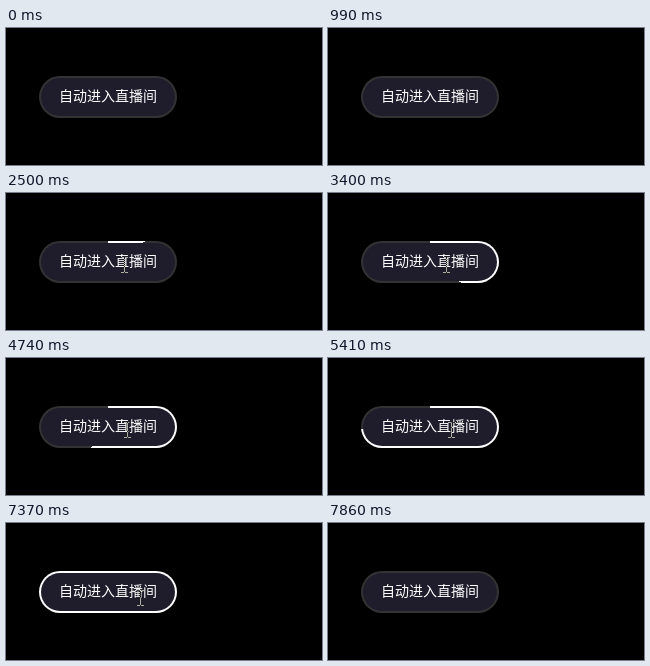
An HTML page for the animation above (8260 ms loop, 316 px wide and 137 px high).

```html
<!DOCTYPE html>
<html lang="zh-CN">
<head>
<meta charset="utf-8">
<style>
  html, body { margin: 0; width: 100%; height: 100%; overflow: hidden; background: #000; }
  #button {
    position: absolute; left: 33px; top: 48px; width: 138px; height: 42px;
    box-sizing: border-box; border: 2px solid transparent; border-radius: 21px;
    background:
      linear-gradient(#1f1c2b, #1f1c2b) padding-box,
      conic-gradient(#fff var(--angle, 0deg), #333 0) border-box;
    color: #fff; text-align: center; white-space: nowrap;
    font: 500 14px/34px "Noto Sans CJK SC", "Noto Sans CJK", sans-serif;
  }
  svg { position: absolute; left: 0; top: 0; overflow: visible; }
  #beam { mix-blend-mode: difference; }
</style>
</head>
<body>
<div id="button">自动进入直播间</div>
<svg id="arrow" width="12" height="19">
  <path d="M0 0V16.5L3.8 13 6.3 18.5 8.8 17.4 6.4 12H11.5Z" fill="#fff" stroke="#000" stroke-width=".7"/>
</svg>
<svg id="beam" width="7" height="16">
  <path d="M0 .5H3M4 .5H7M3.5 1V15M0 15.5H3M4 15.5H7" fill="none" stroke="#ccc"/>
</svg>
<script>
const LOOP = 8260, TICK = 67.9, ANCHOR = 1190;
const FILL_START = 1620, FILL_SPEED = 0.0709, LEAVE = 7525;

// Pointer moves, latest first; power shapes the easing
const moves = [
  { start: 7240, end: 7840, from: [125, 72], to: [330, 143], power: 2 },
  { start: 3790, end: 5900, from: [118, 72], to: [125, 72], power: 1 },
  { start: 1190, end: 2010, from: [185, 5], to: [118, 72], power: 0.7 },
  { start: 850, end: 986, from: [165, 2], to: [289, -24], power: 2 }
];

const [button, arrow, beam] = ["button", "arrow", "beam"].map(id => document.getElementById(id));

const clamp = (v, max) => Math.min(max, Math.max(0, v));

function pointerAt(t) {
  const move = moves.find(m => t >= m.start);
  if (!move) return [-50, -50];
  const { start, end, from, to, power } = move;
  const k = clamp((t - start) / (end - start), 1) ** power;
  return from.map((v, i) => Math.round(v + (to[i] - v) * k));
}

function place(el, x, y, visible) {
  el.style.transform = `translate(${x}px, ${y}px)`;
  el.style.visibility = visible ? "visible" : "hidden";
}

function draw(now) {
  const time = now % LOOP;
  const t = ANCHOR + Math.floor((time - ANCHOR) / TICK) * TICK;

  const angle = t < LEAVE ? clamp((t - FILL_START) * FILL_SPEED, 360) : 0;
  button.style.setProperty("--angle", angle + "deg");

  const [x, y] = pointerAt(t);
  const overText = x > 53 && x < 151 && y > 60 && y < 77;
  place(arrow, x, y, !overText);
  place(beam, x - 3, y - 8, overText);
}

const start = performance.now();
function frame() {
  draw(performance.now() - start);
  requestAnimationFrame(frame);
}
frame();
</script>
</body>
</html>
```
